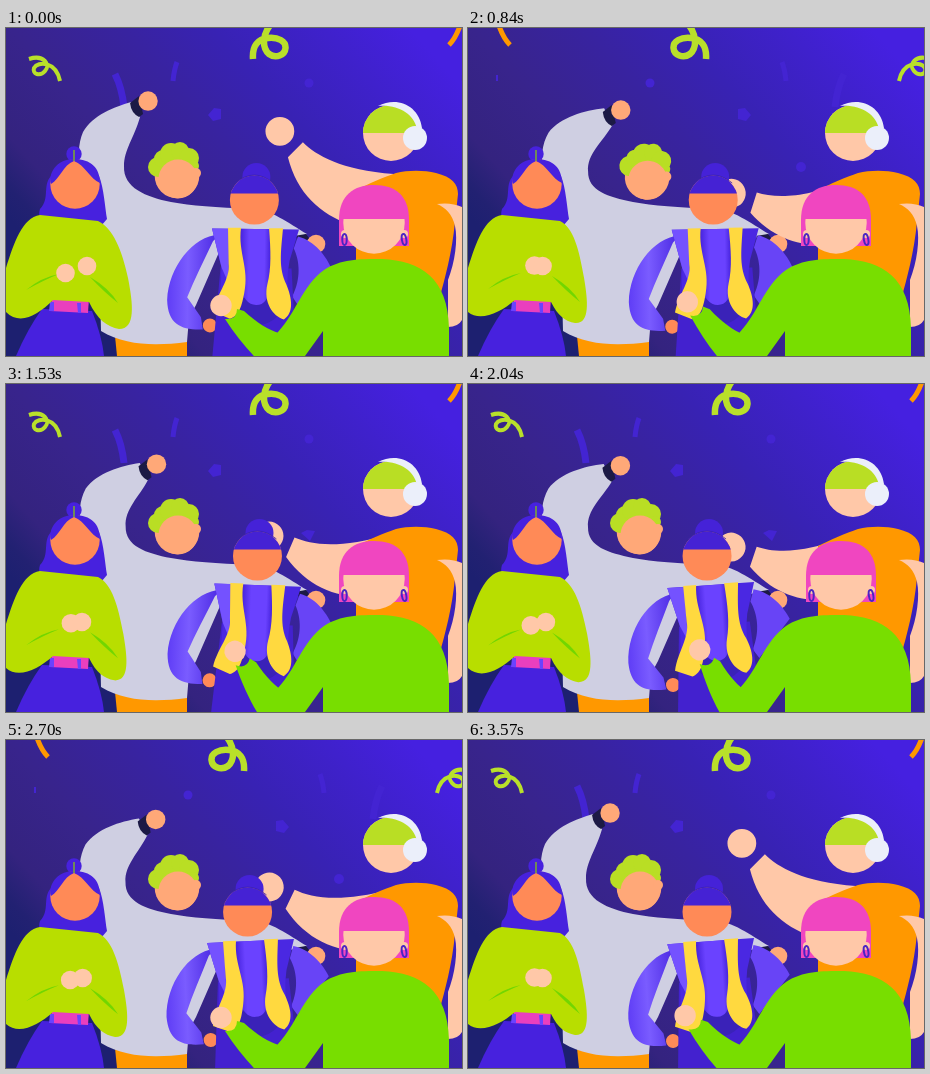
Recreate the animation shown at these times as an HTML page. Size 456 px wide and 328 px high, loop 3.6 s.

```html
<!DOCTYPE html>
<html lang="en">
<head>
<meta charset="utf-8">
<title>Party</title>
<style>
  html, body { margin: 0; width: 100%; height: 100%; overflow: hidden; background: #1d1f6a; }
  svg { display: block; width: 456px; height: 328px; }
</style>
</head>
<body>
<svg viewBox="0 0 456 328">
  <defs>
    <linearGradient id="sky" gradientUnits="userSpaceOnUse" x1="70" y1="265" x2="385" y2="-20">
      <stop offset="0" stop-color="#1d2070"/>
      <stop offset=".05" stop-color="#222172"/>
      <stop offset=".13" stop-color="#34237f"/>
      <stop offset=".3" stop-color="#38248c"/>
      <stop offset=".5" stop-color="#3823a0"/>
      <stop offset=".66" stop-color="#3822b4"/>
      <stop offset=".85" stop-color="#3f21cc"/>
      <stop offset="1" stop-color="#4520e0"/>
    </linearGradient>
    <linearGradient id="sleeve">
      <stop offset="0" stop-color="#5f3df6"/>
      <stop offset=".4" stop-color="#7a5cff"/>
      <stop offset="1" stop-color="#4a28e2"/>
    </linearGradient>
    <linearGradient id="front-panel">
      <stop offset="0" stop-color="#4522dc"/>
      <stop offset=".3" stop-color="#6a42ff"/>
      <stop offset=".8" stop-color="#6a42ff"/>
      <stop offset="1" stop-color="#4522dc"/>
    </linearGradient>
    <clipPath id="capTop"><rect x="350" y="70" width="70" height="35"/></clipPath>
    <clipPath id="bobTop"><rect x="215" y="140" width="64" height="24.500"/></clipPath>
    <clipPath id="faceLow"><rect x="330" y="191" width="80" height="40"/></clipPath>
  </defs>

  <rect width="456" height="328" fill="url(#sky)"/>

  <g id="confetti" fill="none">
    <path d="M23 31C38 26 45 37 39 43C34 49 26 46 28 40C32 33 50 33 54 53" stroke="#b9e02a" stroke-width="4"/>
    <path d="M247 31C246 18 252 11 262 10C272 9 280 13 279.500 20C279 27 270 31 263 26C256 20 256 7 265 -4" stroke="#b9e02a" stroke-width="6.5"/>
    <path d="M443 17C449 11 452 4 455 -5" stroke="#ff9800" stroke-width="5"/>
    <g stroke="#4324d2">
      <path d="M109 46Q116 60 118 79" stroke-width="7"/>
      <path d="M171 34Q168 42 167 53" stroke-width="5"/>
      <path d="M456 47V53" stroke-width="2"/>
    </g>
    <g fill="#4324d2">
      <path d="M202 87L208 80L215 81V91L207 93Z"/>
      <circle cx="303" cy="55" r="4.5"/>
      <path d="M295 149L301 146L309 147L304 157Z"/>
      <circle cx="152" cy="139" r="5"/>
    </g>
  </g>

  <g id="grey">
    <path d="M109 308H181V328H111Z" fill="#ff9800"/>
    <path id="shirt" fill="#cfcfe2"/>
    <circle cx="310" cy="216" r="9.3" fill="#ffa878"/>
    <path d="M288 208L300 206L303 210L297 216Z" fill="#1c1a45"/>
    <g id="wave">
      <path d="M124 75L133 68L137 86L133 89Q125 85 124 75Z" fill="#1c1a45"/>
      <circle cx="142" cy="73" r="9.7" fill="#ffa878"/>
    </g>
    <g id="nod">
      <circle cx="171" cy="148" r="22.3" fill="#ffa878"/>
      <g id="curls" fill="#b9de24"></g>
      <circle cx="172" cy="151" r="19.500" fill="#ffa878"/>
      <circle cx="190" cy="145" r="5" fill="#ffa878"/>
    </g>
  </g>

  <g id="dj">
    <g id="punch" fill="#ffc8a8">
      <circle cx="274" cy="103" r="14.4"/>
      <path d="M297 114C310 127 335 142 388 146L392 180L345 197C314 186 291 165 282 129Z"/>
    </g>
    <path d="M350 162C362 156 378 149 390 145C402 142 418 142 430 145C446 149 452 156 452 166L449 194C446 225 439 250 433 272V328H350Z" fill="#ff9800"/>
    <path d="M431 176Q445 174 456 179V292Q452 299 442 299V252C449 234 452 212 449 198C446 186 440 180 431 176Z" fill="#ffc8a8"/>
    <circle cx="385" cy="105" r="28" fill="#ffc8a8"/>
    <circle cx="385" cy="105" r="28" fill="#b9de24" clip-path="url(#capTop)"/>
    <path d="M372 78C392 68 413 78 416 100L411 101C408 86 392 76 372 78Z" fill="#ebeffa"/>
    <circle cx="409" cy="110" r="12" fill="#ebeffa"/>
  </g>

  <g id="clapper">
    <path d="M47 146C35 156 45 170 34 181C32 187 34 192 38 196L95 198L101 191C99 180 98 160 93 148Z" fill="#4721de"/>
    <path d="M36 281L86 283Q96 308 98 328H10Q22 300 36 281Z" fill="#4721de"/>
    <path d="M46 270H83L82 285L44 283Z" fill="#e93fbe"/>
    <path d="M44 274H48V283H43ZM71 275H75V285H72Z" fill="#6a42ff"/>
    <path id="jumper" fill="#b8de00"/>
    <g id="folds" fill="#72d600">
      <path d="M20 261Q36 248 53 245Q38 251 20 261Z"/>
      <path d="M84 248Q103 259 112 274Q98 263 84 248Z"/>
    </g>
    <circle id="handL" r="9.3" fill="#ffc8a8"/>
    <circle id="handR" r="9.3" fill="#ffc8a8"/>
    <circle cx="68" cy="126" r="7.7" fill="#4721de"/>
    <circle cx="69" cy="156" r="24.7" fill="#ff8a57"/>
    <path d="M68 131C50 131 42 146 45 156C54 151 57 137 68 133C79 137 84 151 94 155C94 140 85 131 68 131Z" fill="#4721de"/>
    <path d="M68 122V133" stroke="#8bd000" stroke-width="1.2"/>
  </g>

  <g id="sway">
    <path d="M291 208C308 212 320 228 325 240L292 277L286 268C295 250 293 232 287 220Z" fill="#6844f6"/>
    <circle cx="204" cy="298" r="7" fill="#ff8a57"/>
    <path d="M212 207C186 209 162 240 161 273C162 298 176 303 197 302L195 290L181 270C188 252 197 234 206 214Z" fill="url(#sleeve)"/>
    <path d="M214 240L285 240L288 285V340H206L210 290Z" fill="#4321cf"/>
    <path d="M236 262H264L272 288Q252 306 232 288Z" fill="#3a22b8"/>
    <path d="M205 201H292L283 232Q279 254 283 270H214L215 240Z" fill="#4a28e2"/>
    <path d="M205 201H222V255L215 240Z" fill="#7452ff"/>
    <path d="M233 201H264V258Q262 277 250 277Q238 277 234 258Z" fill="url(#front-panel)"/>
    <g fill="#ffd93f">
      <path d="M221 200H234C231 225 243 240 238 265C235 282 232 288 224 291L207 284C211 265 224 252 222 236Z"/>
      <path d="M262 200H276C274 225 272 240 280 256C286 270 288 284 278 291C267 288 257 274 261 256C265 240 264 222 262 200Z"/>
    </g>
  </g>
  <g id="head">
    <circle cx="249" cy="148" r="14" fill="#4522d8"/>
    <circle cx="247" cy="171" r="24.5" fill="#ff8a57"/>
    <circle cx="247" cy="171" r="24.5" fill="#4522d4" clip-path="url(#bobTop)"/>
    <path d="M228 154Q247 138 266 154" fill="none" stroke="#3a22ae" stroke-width=".8"/>
  </g>

  <g id="front">
    <g id="lift">
      <circle cx="215" cy="277.500" r="10.7" fill="#ffc8a8"/>
      <path d="M219 291Q231 292 231 281L238 283C251 295 263 302 273 305L293 325L288 336H256C243 324 230 308 219 291Z" fill="#78de00"/>
    </g>
    <path d="M317 303L299 328H262V322L272 304C290 285 296 258 318 242C335 231 352 231 376 231C415 233 442 250 443 300V328H317Z" fill="#78de00"/>
    <g id="tilt">
      <path d="M333 218V192C333 167 348 157 368 157C390 157 403 168 403 192V218Z" fill="#f046c0"/>
      <circle cx="339" cy="206" r="4" fill="#ffc8a8"/>
      <circle cx="398" cy="206" r="4" fill="#ffc8a8"/>
      <circle cx="368" cy="195" r="30.7" fill="#ffc8a8" clip-path="url(#faceLow)"/>
      <g fill="none" stroke="#4a25c4" stroke-width="2">
        <ellipse cx="338.500" cy="211.500" rx="2.200" ry="5.500"/>
        <ellipse cx="398" cy="211.500" rx="2.200" ry="5.500" transform="rotate(-10 398 211)"/>
      </g>
    </g>
  </g>
</svg>

<script>
const LOOP = 3600, STEP = 30;
const $ = id => document.getElementById(id);
const set = (id, name, value) => $(id).setAttribute(name, value);
const turn = (id, deg, x, y) => set(id, 'transform', `rotate(${deg} ${x} ${y})`);
const move = (id, x, y) => set(id, 'transform', `translate(${x} ${y})`);
const ease = u => (1 - Math.cos(Math.PI * Math.min(1, Math.max(0, u)))) / 2;

// Blend two paths that share the same commands.
const blend = (a, b, u) => {
  const to = b.match(/-?[\d.]+/g);
  let i = 0;
  return a.replace(/-?[\d.]+/g, n => (+n + (to[i++] - n) * u).toFixed(2));
};

// Swing through turning points [time, value].
const swing = (points, t) => {
  let i = 1;
  while (i < points.length - 1 && t > points[i][0]) i++;
  const [t0, v0] = points[i - 1], [t1, v1] = points[i];
  return v0 + (v1 - v0) * ease((t - t0) / (t1 - t0));
};

// Rise, hold and fall back between two times.
const bump = (t, from, to, ramp = 300) => ease((t - from) / ramp) * ease((to - t) / ramp);

const torso = 'C67 128 76 160 92 185L95 303C120 318 150 318 181 314L183 290L190 277L214 222L240 215' +
  'L290 209L301 206C282 195 265 181 245 181C210 179 185 178 165 174';
const shirt = [
  'M125 74C108 79 87 87 77 104' + torso + 'C140 169 117 160 118 138C118 122 128 110 134 89Z',
  'M141 83C120 84 95 90 82 105' + torso + 'C140 169 121 164 121 146C119 128 137 116 149 101Z'
];
const jumper = [
  'M34 187C16 190 8 215 0 240V284C12 294 32 285 47 272L83 274C90 288 97 293 107 295C122 296 120 274 116 250C111 222 106 200 92 193Z',
  'M34 187C16 190 8 215 0 240V284C14 298 32 287 47 272L83 274C91 291 101 299 113 301C130 301 127 276 122 250C116 222 107 200 92 193Z'
];
const claps = [[0, 1], [180, 0], [350, 1], [520, 0], [690, 1], [850, 0], [1030, 1], [1210, 0],
  [1400, 1], [1590, 0], [1770, 1], [1950, 0], [2125, 1], [2290, 0], [2450, 1], [2610, 0],
  [2840, 1], [2990, 0], [3220, 1], [3395, 1], [3570, 0], [3600, 0]];
const dance = [[-200, 1], [250, -1], [600, 1], [1020, -1], [1760, 1], [2050, -1],
  [2420, 1], [2800, -1], [3180, 1], [3570, -1], [3600, -1]];

$('curls').innerHTML = [[152, 139, 10], [157, 131, 9], [165, 126, 11], [174, 123, 9], [183, 130, 10], [187, 138, 6]]
  .map(([x, y, r]) => `<circle cx="${x}" cy="${y}" r="${r}"/>`).join('');

function draw(t) {
  const flip = t % 1800 >= 570 && t % 1800 < 1440;
  set('confetti', 'transform', flip ? 'translate(485 0) scale(-1 1)' : '');

  const beat = (1 - Math.cos(2 * Math.PI * (t / 1190 - .02))) / 2;
  turn('punch', -39.5 * beat, 396, 156);
  move('wave', 15.5 * beat, 13 * beat);
  set('shirt', 'd', blend(...shirt, beat));
  turn('nod', 7 * bump(t, 450, 1350), 165, 215);

  const open = swing(claps, t);
  set('jumper', 'd', blend(...jumper, open));
  set('handL', 'cx', 66.5 - 7 * open);
  set('handL', 'cy', 237.5 + 7.5 * open);
  set('handR', 'cx', 74.5 + 6.5 * open);
  set('handR', 'cy', 238);
  move('folds', 0, open);

  const lean = swing(dance, t);
  turn('sway', 4 * lean, 247, 285);
  move('head', 8 * lean, 1);

  const up = 1 - Math.abs(1 - t % 450 / 225);
  set('lift', 'transform', `translate(${4 * up} ${4 * up}) rotate(${17.5 * up} 275 315)`);
  move('tilt', 5 * bump(t, 1650, 2450), 0);
}

const start = performance.now();
function tick() {
  const t = (performance.now() - start) % LOOP;
  draw(Math.floor(t / STEP) * STEP);
  requestAnimationFrame(tick);
}
draw(0);
tick();
</script>
</body>
</html>
```
